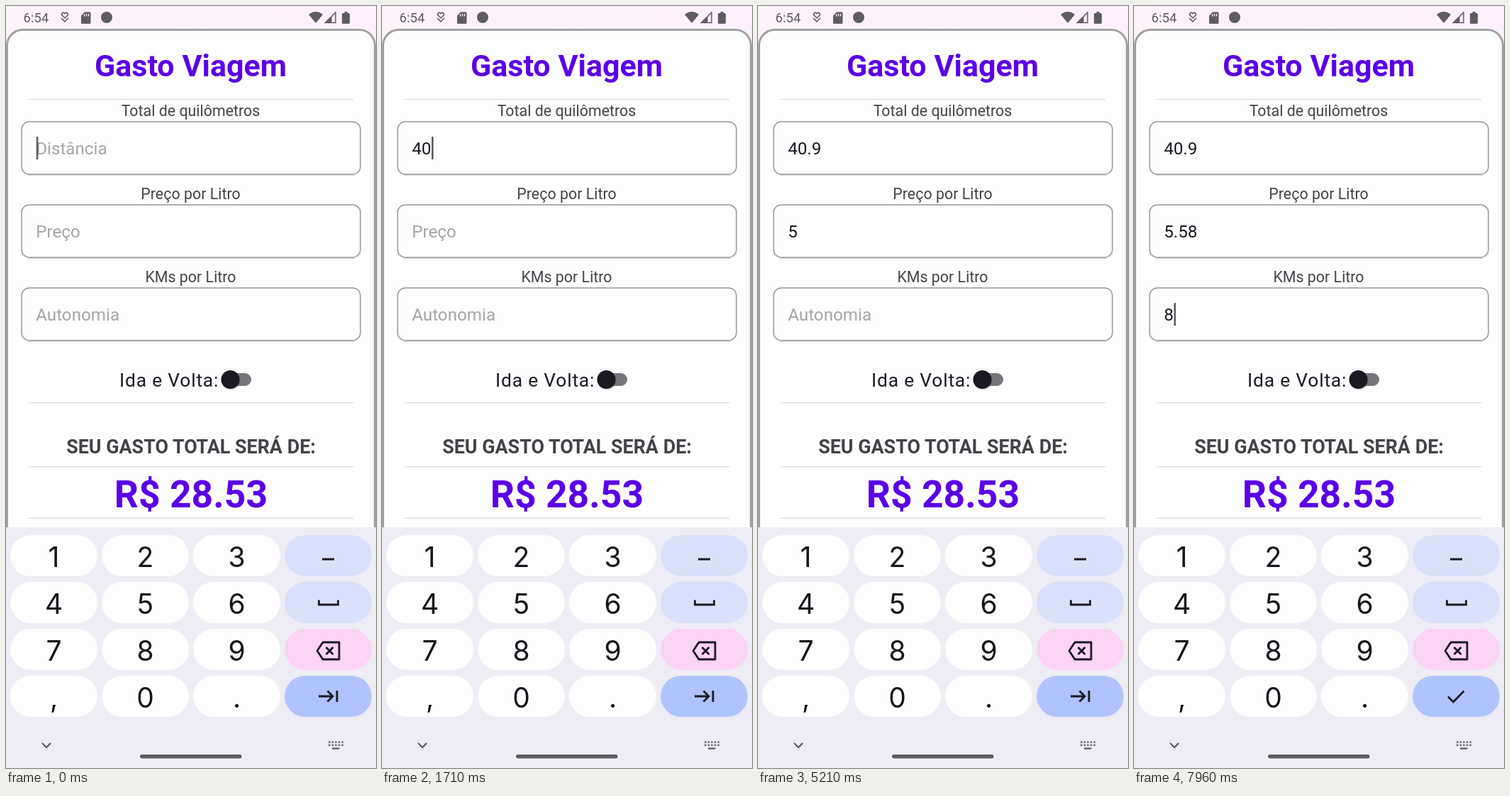
Recreate the animation shown at these times as an HTML page. Size 522 by 1073 pixels, loop 8000 ms.

```html
<!DOCTYPE html>
<html lang="pt-BR">
<head>
<meta charset="utf-8">
<title>Gasto Viagem</title>
<style>
  html, body { margin: 0; width: 100%; height: 100%; overflow: hidden; background: #fdf3fb; }
  svg { display: block; width: 100%; height: 100%; font-family: Roboto, sans-serif; }
  .mid { text-anchor: middle; }
  .brand { fill: #5b00e8; font-weight: 700; }
  .label { fill: #454349; font-size: 21.4px; }
  .value { font-size: 24.2px; fill: #1b1822; }
  .value.hint { fill: #a5a4a7; }
  .box { fill: none; stroke: #99979b; stroke-width: 1.5; }
  .rule { stroke: #dddcdf; stroke-width: 1.5; }
  .digit { font: 400 39px Inter, Roboto, sans-serif; fill: #17151c; }
  .line { fill: none; stroke: #1b1a22; stroke-width: 2.8; }
  .status { fill: #5f5b62; }
</style>
</head>
<body>
<svg viewBox="0 0 522 1073" preserveAspectRatio="none">
  <defs>
    <linearGradient id="bar">
      <stop offset="0" stop-color="#fcf2f8"/>
      <stop offset="1" stop-color="#fdf0fc"/>
    </linearGradient>
  </defs>
  <rect width="522" height="60" fill="url(#bar)"/>
  <rect x="1.5" y="33.5" width="519" height="760" rx="22" fill="#fdfdfd" stroke="#a1a0a2" stroke-width="3"/>

  <g class="status">
    <text x="24.5" y="23" font-size="18.3" letter-spacing=".2">6:54</text>
    <path d="M83 17l-4-4a2.3 2.3 0 0 1 4-2.5a2.3 2.3 0 0 1 4 2.5zM78 17l5 5 5-5" fill="none" stroke="#5f5b62" stroke-width="1.6"/>
    <path d="M111 8.500h7q1.500 0 1.500 1.500v13.500q0 1.500-1.500 1.500h-10.500q-1.500 0-1.500-1.500v-10z"/>
    <path d="M110.500 11v3.500M113.500 11v3.500M116.500 11v3.500" stroke="#fcf2f8" stroke-width="1.300"/>
    <circle cx="142" cy="16" r="8"/>
    <path d="M427 12q10-8 20 0l-10 12z"/>
    <path d="M465 9v14.500h-14.500z" fill="none" stroke="#5f5b62" stroke-width="1.500"/>
    <path d="M459.500 14.500v9h-10z"/>
    <path d="M477.500 8h4v2h2q1.500 0 1.500 1.500v12q0 1.500-1.500 1.500h-8q-1.500 0-1.500-1.500v-12q0-1.500 1.500-1.500h2z"/>
  </g>

  <text class="mid brand" x="260.5" y="99" font-size="43">Gasto Viagem</text>
  <path class="rule" d="M32 131.500H490M32 558.500H490M32 648.800H490M32 721.200H490"/>
  <g id="fields"></g>
  <rect id="caret" y="184" width="2.500" height="32" fill="#5a5560"/>

  <text x="160" y="536" font-size="26.4" letter-spacing=".8" fill="#1b1822">Ida e Volta:</text>
  <rect x="304" y="517" width="42" height="18" rx="9" fill="#77747a"/>
  <circle cx="317" cy="527.500" r="13.500" fill="#000" opacity=".15"/>
  <circle cx="316.500" cy="526" r="13" fill="#1b1822"/>

  <text class="mid" x="261" y="630" font-size="26.900" font-weight="700" fill="#444248">SEU GASTO TOTAL SERÁ DE:</text>
  <text class="mid brand" x="261" y="706" font-size="53.500">R$ 28.53</text>

  <rect y="734" width="522" height="339" fill="#eeedf5"/>
  <g id="keys"></g>
  <path class="line" d="M446 779H463M441.500 836.500V843H468.500V836.500"/>
  <path class="line" stroke-linejoin="round" d="M439 908l8-12h23v24h-23zM451.500 903l10 10M461.500 903l-10 10"/>
  <path class="line" id="next" d="M441 972H460M453.500 964.500l7.500 7.500-7.500 7.500M467 964V980"/>
  <path class="line" id="done" d="M443 972.500l7.500 7.500 15-15.500"/>
  <path d="M51 1038l6 6 6-6" fill="none" stroke="#55535a" stroke-width="2"/>
  <path d="M455 1036.500h21M455 1040.800h21" stroke="#66646a" stroke-width="2.400" stroke-dasharray="2.400 2.200"/>
  <path d="M460 1045.500h10.500" stroke="#66646a" stroke-width="2.400"/>
  <rect x="189" y="1054" width="143.500" height="5.500" rx="2.750" fill="#5e5c61"/>
</svg>
<script>
  const LOOP = 8000, BLINK = 500, ROW = 117;
  const byId = id => document.getElementById(id);

  function add(parent, tag, attrs, text = '') {
    const el = document.createElementNS('http://www.w3.org/2000/svg', tag);
    for (const name in attrs) el.setAttribute(name, attrs[name]);
    el.textContent = text;
    parent.append(el);
    return el;
  }

  const fields = [
    ['Total de quilômetros', 'Distância'],
    ['Preço por Litro', 'Preço'],
    ['KMs por Litro', 'Autonomia']
  ].map(([label, hint], i) => {
    const g = add(byId('fields'), 'g', { transform: `translate(0 ${i * ROW})` });
    add(g, 'text', { class: 'mid label', x: 260.5, y: 155 }, label);
    add(g, 'path', { d: 'M30 238.300H492', stroke: '#dededf', 'stroke-width': 1.5 });
    add(g, 'rect', { class: 'box', x: 22, y: 163, width: 478, height: 74, rx: 11 });
    return { hint, text: add(g, 'text', { class: 'value hint', x: 42.2, y: 209 }, hint) };
  });

  const sideColors = ['#d9e1fa', '#d9e1fa', '#fbd3f5', '#b0c3fc'];
  ['123', '456', '789', ',0.'].forEach((row, r) => {
    for (let c = 0; c < 4; c++) {
      const x = 6 + c * 129, y = 745 + r * 66;
      const fill = c < 3 ? '#fdfdfd' : sideColors[r];
      add(byId('keys'), 'rect', { x, y, width: 123, height: 58, rx: 29, fill });
      if (c < 3) add(byId('keys'), 'text', { class: 'mid digit', x: x + 61.5, y: y + 45 }, row[c]);
    }
  });

  // [time, focused field, its content]; the caret blink restarts at each step
  const steps = [
    [-50, 0, ''], [1300, 0, '4'], [1650, 0, '40'], [2050, 0, '40.'], [2450, 0, '40.9'],
    [3400, 1, ''], [4500, 1, '5'], [5400, 1, '5.'], [5650, 1, '5.5'], [5900, 1, '5.58'],
    [6200, 2, ''], [7500, 2, '8']
  ];

  function draw(t) {
    const values = ['', '', ''];
    let since = 0, focus = 0;
    for (const [time, field, value] of steps) {
      if (time > t) break;
      values[field] = value;
      focus = field;
      since = time;
    }
    fields.forEach(({ text, hint }, i) => {
      text.textContent = values[i] || hint;
      text.classList.toggle('hint', !values[i]);
    });
    const width = values[focus] ? fields[focus].text.getComputedTextLength() : 0;
    const caret = byId('caret');
    caret.setAttribute('x', 42.8 + width);
    caret.setAttribute('y', 184 + focus * ROW);
    caret.style.opacity = (t - since) % (2 * BLINK) < BLINK ? 1 : 0;
    byId('next').style.opacity = focus < 2 ? 1 : 0;
    byId('done').style.opacity = focus < 2 ? 0 : 1;
  }

  const start = performance.now();
  function tick() {
    draw((performance.now() - start) % LOOP);
    requestAnimationFrame(tick);
  }
  tick();
</script>
</body>
</html>
```
